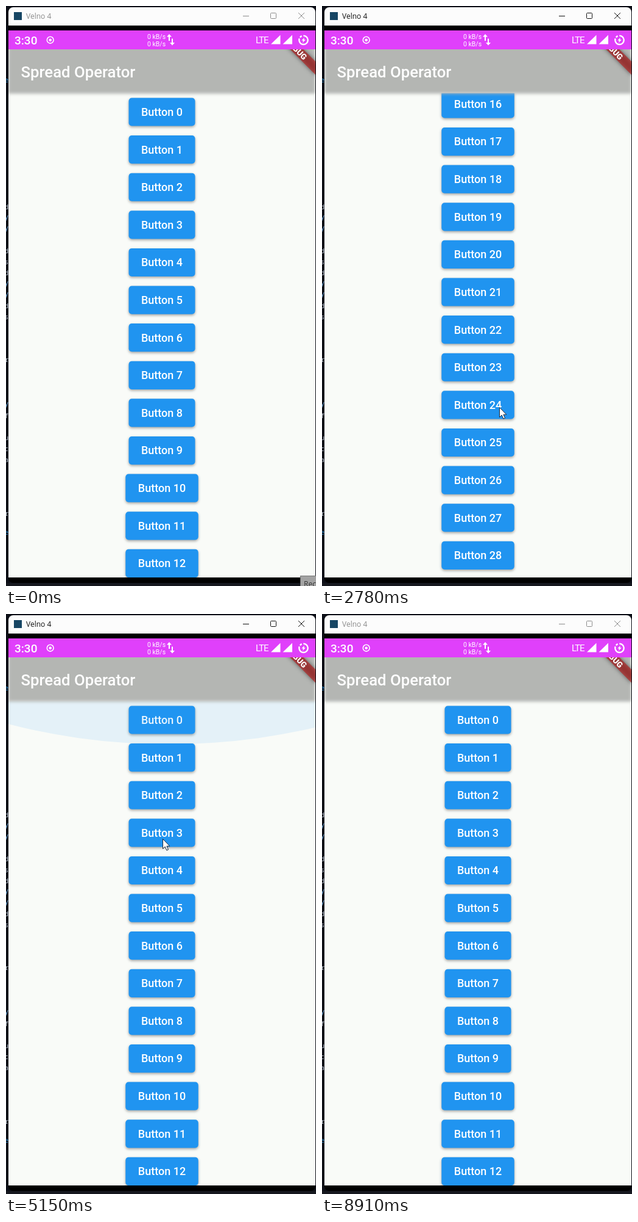
Recreate the animation shown at these times as an HTML page with a canvas. Size 509x950 px, loop 8.98 s.

```html
<!DOCTYPE html>
<html lang="en">
<head>
<meta charset="utf-8">
<title>Scrolling button list</title>
<style>
  html, body { margin: 0; width: 100%; height: 100%; overflow: hidden; background: #0d0f17; }
  canvas { display: block; }
</style>
</head>
<body>
<canvas id="stage" width="509" height="950"></canvas>
<script>
const ctx = document.getElementById('stage').getContext('2d');
const LOOP = 8980, PITCH = 61.62, COUNT = 30;
const VIEW = { x: 4, y: 142.8, w: 504, h: 793.2 };

// Pointer: time, x, y, pressed until the next key
const pointerKeys = [
  [260, 506, 845, 0], [1100, 310, 730, 1], [1300, 300, 450, 0], [1780, 296, 690, 1],
  [2070, 292, 432, 1], [2100, 292, 405, 0], [2780, 291, 657, 0], [2850, 290, 665, 1],
  [3050, 288, 440, 0], [3350, 285, 380, 1], [3600, 280, 640, 0], [3880, 272, 430, 1],
  [4040, 271, 565, 1], [4100, 271, 615, 0], [4400, 262, 330, 0], [4780, 262, 340, 1],
  [5000, 260, 640, 0], [5150, 257, 368, 0], [5300, 258, 380, 1], [5560, 300, 885, 0],
  [6120, 360, 400, 1], [6420, 372, 885, 0], [6700, 385, 720, 1], [7000, 392, 430, 0],
  [7450, 397, 160, 1], [7580, 397, 288, 1], [7743, 397, 448, 1], [7880, 400, 600, 0],
  [8340, 430, 915, 0], [8690, 470, 952, 0]
];
// List: time, offset, 1 if it coasts to this offset
const scrollKeys = [
  [0, 0], [1100, 0], [1300, 280], [1780, 639, 1], [2070, 897], [2100, 924], [2700, 999, 1],
  [2850, 999], [2900, 1055], [3350, 1055], [3600, 795], [3880, 560, 1], [4040, 425],
  [4100, 375], [4500, 0], [6700, 0], [7000, 290], [7250, 308, 1], [7450, 308],
  [7580, 180], [7743, 0], [LOOP, 0]
];
// Overscroll glow: start, peak, end, 1 if at the bottom
const pulls = [
  [2900, 3050, 3600, 1], [4500, 4560, 4800, 0], [4780, 5000, 5500, 0],
  [5300, 5560, 6060, 0], [6120, 6420, 7000, 0], [7743, 7880, 8560, 0]
];

const mix = (a, b, p) => a + (b - a) * p;

function segment(keys, t) {
  const i = Math.max(1, keys.findIndex(k => k[0] > t));
  const a = keys[i - 1], b = keys[i];
  return { a, b, p: (t - a[0]) / (b[0] - a[0]) };
}

function scrollAt(t) {
  const { a, b, p } = segment(scrollKeys, t);
  return mix(a[1], b[1], b[2] ? p * (2 - p) : p);
}

function rect(x, y, w, h, color, radius = 0) {
  ctx.fillStyle = color;
  ctx.beginPath();
  ctx.roundRect(x, y, w, h, radius);
  ctx.fill();
}

function text(str, x, y, font, color, align = 'left', spacing = '0px') {
  ctx.font = font;
  ctx.fillStyle = color;
  ctx.textAlign = align;
  ctx.letterSpacing = spacing;
  ctx.fillText(str, x, y);
}

function poly(points, fill, stroke) {
  ctx.beginPath();
  for (let i = 0; i < points.length; i += 2) ctx.lineTo(points[i], points[i + 1]);
  ctx.closePath();
  if (fill) { ctx.fillStyle = fill; ctx.fill(); }
  if (stroke) { ctx.strokeStyle = stroke; ctx.lineWidth = 1; ctx.stroke(); }
}

function arc(x, y, r, from, to, width) {
  ctx.beginPath();
  ctx.arc(x, y, r, from, to);
  ctx.strokeStyle = '#fff';
  ctx.lineWidth = width;
  ctx.stroke();
}

function disc(x, y, r, color) {
  rect(x - r, y - r, 2 * r, 2 * r, color, r);
}

function clipped(x, y, w, h, draw) {
  ctx.save();
  ctx.beginPath();
  ctx.rect(x, y, w, h);
  ctx.clip();
  draw();
  ctx.restore();
}

function drawDesktop() {
  rect(0, 0, 509, 950, '#0d0f17');
  rect(0, 945, 509, 5, '#16181f');
  const rows = { d: [333, 405, 441, 495], y: [349, 367, 457, 475, 655], s: [423, 513],
                 f: [675], u: [711], c: [729], a: [747], r: [583, 835] };
  for (const [letter, ys] of Object.entries(rows))
    for (const y of ys)
      text(letter, 4, y, '11px "Noto Sans Mono", monospace', letter === 'y' ? '#6fa8d8' : '#b8c0cc', 'right');
  for (const y of [125, 866]) text('e', 4, y, '11px "Noto Sans Mono", monospace', '#2c8fd0', 'right');
  rect(4, 2, 504, 943, '#000', 8);
}

function drawTitleBar(active) {
  const ink = active ? '#111' : '#8b8b8b';
  rect(4, 2, 504, 30, '#fcfcfc', [8, 8, 0, 0]);
  rect(13, 10, 13, 13, '#174664');
  text('Velno 4', 33, 21, '12px "Open Sans", sans-serif', ink);
  ctx.strokeStyle = ink;
  ctx.lineWidth = 1;
  ctx.beginPath();
  ctx.moveTo(389, 16.5); ctx.lineTo(399, 16.5);
  ctx.roundRect(434.5, 11.5, 9, 9, 1);
  ctx.moveTo(480, 11); ctx.lineTo(490, 21);
  ctx.moveTo(490, 11); ctx.lineTo(480, 21);
  ctx.stroke();
}

function drawStatusBar() {
  rect(4, 40, 504, 31, '#e040fb');
  text('3:30', 14, 63, '500 19px Roboto, sans-serif', '#fff');
  arc(72.7, 55.7, 5.4, 0, 7, 1.6);
  disc(72.7, 55.7, 2.3, '#fff');
  for (const y of [54, 65.5]) text('0 kB/s', 232, y, '10.5px Roboto, sans-serif', '#fff');
  poly([268, 46, 272, 50.5, 269, 50.5, 269, 57, 267, 57, 267, 50.5, 264, 50.5], '#fff');
  poly([273, 64.5, 277, 60, 274, 60, 274, 53.5, 272, 53.5, 272, 60, 269, 60], '#fff');
  text('LTE', 410, 61, '15px Roboto, sans-serif', '#fff', 'left', '-1px');
  for (const x of [450.5, 470]) poly([x - 15.5, 62.5, x, 62.5, x, 47.5], '#fff');
  arc(488.5, 55.8, 7.2, -1.6, 3.5, 2.4);
  arc(488.5, 55.8, 7.2, 3.8, 4.3, 2.4);
  poly([490, 51.5, 485.3, 56.6, 488, 56.6, 487, 60.5, 491.8, 55, 489, 55], '#fff');
}

function drawAppBar() {
  clipped(4, 71, 504, 90, () => {
    ctx.filter = 'blur(2.5px)';
    rect(4, 55, 504, 88.5, '#b4b6b3');
    ctx.filter = 'none';
    text('Spread Operator', 24.6, 116.5, '500 25.7px Roboto, sans-serif', '#fff');
    ctx.translate(508, 40);
    ctx.rotate(Math.PI / 4);
    ctx.filter = 'blur(3.5px)';
    rect(-51.3, 35.9, 102.6, 15.4, 'rgba(0,0,0,.5)');
    ctx.filter = 'none';
    rect(-51.3, 35.9, 102.6, 15.4, 'rgba(183,28,28,.63)');
    text('DEBUG', 0, 48.3, '900 13.1px Roboto, sans-serif', '#fff', 'center');
  });
}

function drawButton(index, y) {
  const w = index < 10 ? 109 : 119.5;
  ctx.save();
  ctx.shadowColor = 'rgba(0,0,0,.35)';
  ctx.shadowBlur = 4;
  ctx.shadowOffsetY = 2;
  rect(256 - w / 2, y - 23.1, w, 46.2, '#2094f0', 5.1);
  ctx.restore();
  text('Button ' + index, 256, y + 6.4, '500 18px Roboto, sans-serif', '#fff', 'center');
}

function drawGlow(t) {
  for (const [start, peak, end, bottom] of pulls) {
    if (t <= start || t >= end) continue;
    const amount = t < peak ? (t - start) / (peak - start) : (end - t) / (end - peak);
    const reach = -655 * amount;
    ctx.fillStyle = `rgba(33,150,243,${0.138 * amount})`;
    ctx.beginPath();
    ctx.ellipse(267, bottom ? VIEW.y + VIEW.h - reach : VIEW.y + reach, 756, 756 * amount, 0, 0, 7);
    ctx.fill();
  }
}

function drawList(t) {
  clipped(VIEW.x, 71, VIEW.w, 865, () => rect(4, 71, 504, 865, '#f9fbf8'));
  clipped(VIEW.x, VIEW.y, VIEW.w, VIEW.h, () => {
    const offset = scrollAt(t);
    for (let i = 0; i < COUNT; i++) {
      const y = 173.5 + i * PITCH - offset;
      if (y > 110 && y < 970) drawButton(i, y);
    }
    drawGlow(t);
  });
}

function drawPointer(t) {
  if (t < 260 || t >= 8690) return;
  const { a, b, p } = segment(pointerKeys, t);
  const eased = a[3] ? p : p * p * (3 - 2 * p);
  const x = mix(a[1], b[1], eased), y = mix(a[2], b[2], eased);
  if (a[3]) disc(x, y, 12, 'rgba(255,247,30,.52)');
  ctx.save();
  ctx.translate(x + .5, y + .5);
  poly([0, 0, 0, 16, 3.7, 12.6, 6.3, 18.6, 9, 17.5, 6.4, 11.7, 11.3, 11.7], '#fff', '#1c2a3c');
  ctx.restore();
}

function drawTooltip() {
  rect(483, 933, 26, 17, '#777');
  rect(484, 934, 25, 16, '#a3a3a3');
  text('Reco', 489, 951, '12px "Open Sans", sans-serif', '#333');
}

function frame(now) {
  const t = now % LOOP;
  drawDesktop();
  drawTitleBar(t >= 1100 && t < 8840);
  drawList(t);
  drawAppBar();
  drawStatusBar();
  if (t < 70) drawTooltip();
  drawPointer(t);
  requestAnimationFrame(() => frame(performance.now() - begin));
}

const begin = performance.now();
frame(0);
</script>
</body>
</html>
```
